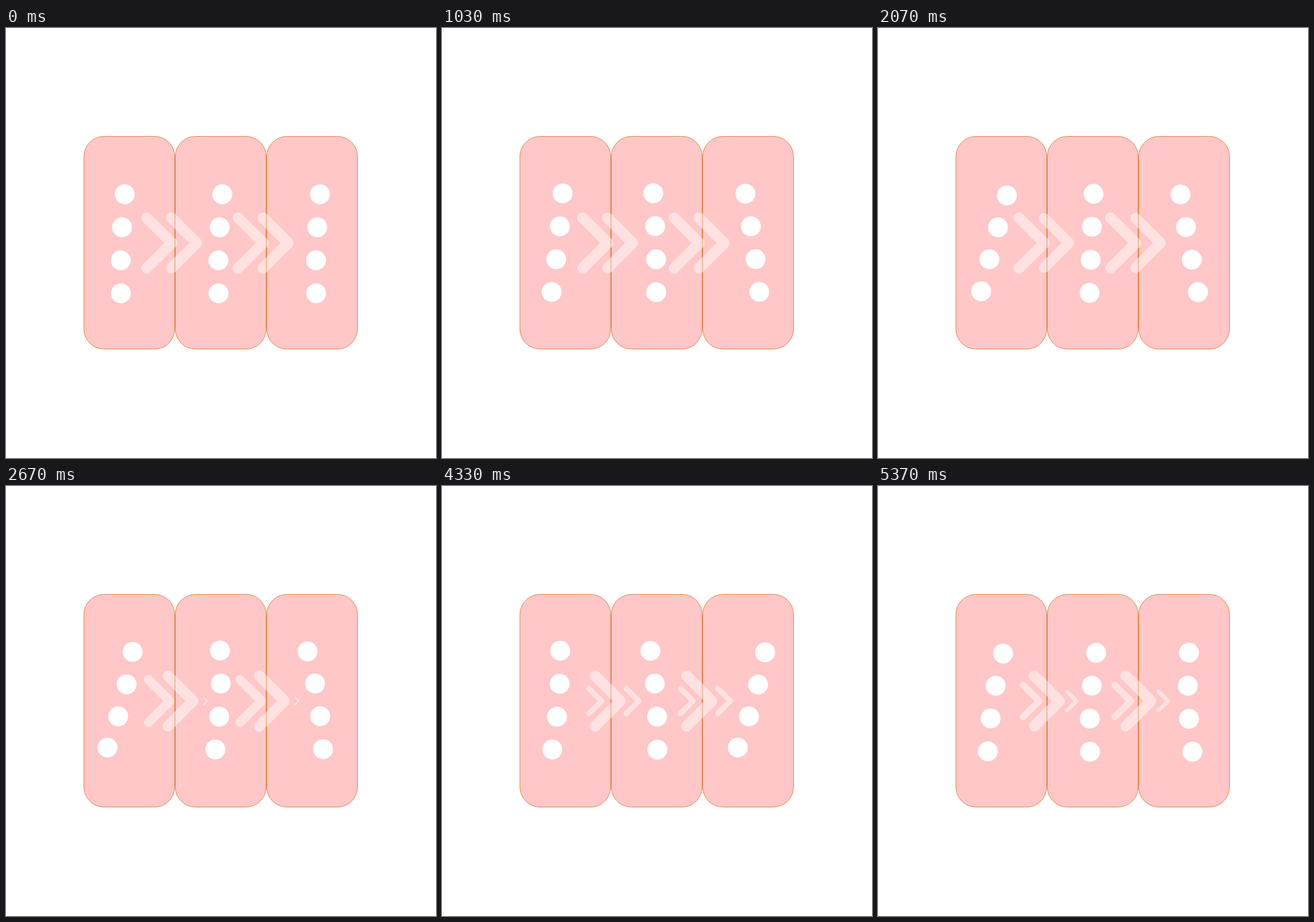
An HTML page with a canvas for the animation above (5410 ms loop, 748x748 px).

```html
<!DOCTYPE html>
<html lang="en">
<head>
<meta charset="utf-8">
<title>Three swaying chains</title>
<style>
  html, body { margin: 0; width: 100%; height: 100%; overflow: hidden; background: #fff; }
  canvas { display: block; }
</style>
</head>
<body>
<canvas id="stage" width="748" height="748"></canvas>
<script>
const ctx = document.getElementById('stage').getContext('2d');
const LOOP = 5410, LAST = 161, CYCLE = 28.8;
const LINK = 57.5, DOT = 17.3;

// Lean of each chain (pixels sideways per dot) at a few turning points
const TURNS = [0, 17, 44, 80, 103, 130, 161];
const LEANS = [
  [-2.2, 3.5, -15.2, -14.6, 6.8, -4.6, -8.9],
  [-2.2, 5.7, -1.9, -2.7, 7.9, 4, -3.6],
  [-2.2, 4.5, 11.2, 9, 8.9, -15.9, 2]
];

function leanAt(leans, step) {
  const i = Math.max(0, TURNS.findLastIndex((turn, k) => turn <= step && k < TURNS.length - 1));
  const s = (step - TURNS[i]) / (TURNS[i + 1] - TURNS[i]);
  return leans[i] + (leans[i + 1] - leans[i]) * s * s * (3 - 2 * s);
}

function drawCards() {
  ctx.fillStyle = '#ffc7c7';
  ctx.strokeStyle = '#e0823f';
  ctx.lineWidth = 1;
  for (let i = 0; i < 3; i++) {
    ctx.beginPath();
    ctx.roundRect(135.5 + 159 * i, 188.5, 158, 370, 35);
    ctx.fill();
    ctx.stroke();
  }
}

function drawChevron(x, scale) {
  if (scale < 0.01) return;
  const w = 22 * scale, h = 43.8 * scale;
  ctx.lineWidth = 18.8 * scale;
  ctx.beginPath();
  ctx.moveTo(x - w, 374 - h);
  ctx.lineTo(x + w, 374);
  ctx.lineTo(x - w, 374 + h);
  ctx.stroke();
}

// Chevrons grow in, slide right and shrink out, in twelve held positions
function drawArrows(step) {
  const phase = Math.floor(step / CYCLE * 12) % 12 / 12;
  const v = (1 - Math.cos(Math.PI * phase)) / 2, shift = 43.3 * v;
  ctx.strokeStyle = 'rgba(255, 255, 255, 0.46)';
  ctx.lineCap = ctx.lineJoin = 'round';
  for (const x of [266.5, 425.7]) {
    drawChevron(x, v);
    drawChevron(x + shift, 1);
    drawChevron(x + 43.3 + shift, 1 - v);
  }
}

// All chains bow and drift together; each has its own lean
function drawChain(leans, index, step) {
  const sway = Math.cos(Math.PI * step / CYCLE + 0.96);
  const lean = leanAt(leans, step), bow = 2.1 * sway;
  const midX = 201.4 + 169.8 * index + sway;
  const bend = [bow, -bow, -bow, bow];
  const xs = bend.map((b, i) => midX + lean * (i - 1.5) + b);
  const gaps = xs.slice(1).map((x, i) => Math.sqrt(LINK ** 2 - (x - xs[i]) ** 2));
  let y = 374.3 + 2 * sway - (3 * gaps[0] + 2 * gaps[1] + gaps[2]) / 4;
  ctx.fillStyle = '#fff';
  xs.forEach((x, i) => {
    ctx.beginPath();
    ctx.arc(x, y, DOT, 0, 2 * Math.PI);
    ctx.fill();
    y += gaps[i];
  });
}

function draw() {
  const time = performance.now() % LOOP;
  const step = Math.min(LAST, Math.floor((time + 10) * 0.03));
  ctx.clearRect(0, 0, 748, 748);
  drawCards();
  drawArrows(step);
  LEANS.forEach((leans, i) => drawChain(leans, i, step));
  requestAnimationFrame(draw);
}
draw();
</script>
</body>
</html>
```
